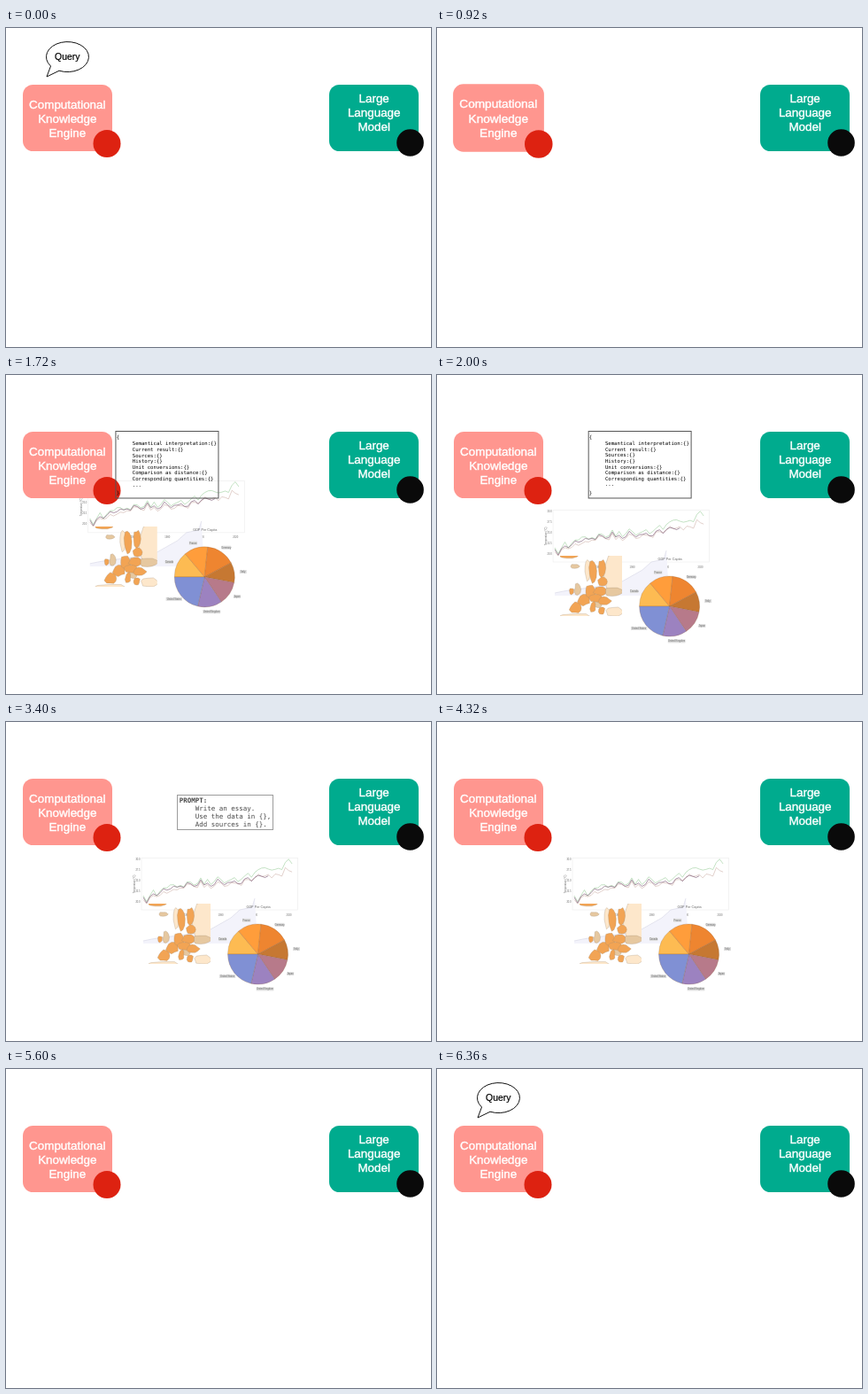
An HTML page for the animation above (6.4 s loop, 480 by 360 pixels).

```html
<!DOCTYPE html>
<html lang="en">
<head>
<meta charset="utf-8">
<title>Knowledge engine and language model</title>
<style>
html, body { margin: 0; width: 100%; height: 100%; overflow: hidden; background: #fff; }
svg { display: block; width: 480px; height: 360px; }
.sans { font-family: "Liberation Sans", Arial, sans-serif; }
.mono { font-family: "DejaVu Sans Mono", monospace; white-space: pre; }
.card { font-size: 13.4px; fill: #fff; stroke: #fff; stroke-width: .4; text-anchor: middle; }
.tiny { font-size: 2.7px; fill: #666; text-anchor: middle; }
.line { fill: none; stroke-width: .6; stroke-linejoin: round; }
</style>
</head>
<body>
<svg viewBox="0 0 480 360">
  <defs>
    <clipPath id="frame"><rect x="161" y="205" width="70" height="68"/></clipPath>
    <g id="figures">
      <rect x="153" y="153.5" width="176.5" height="58.5" fill="none" stroke="#ececec" stroke-width=".6"/>
      <g id="ticks" class="sans tiny"></g>
      <path d="M155 247C180 241 205 242 231 234L254 221L264 212L278 209L281 199L284 250H155Z" fill="#f3f3fb"/>
      <path d="M155 247C180 241 205 242 231 234L254 221L264 212L278 209L281 199" class="line" stroke="#d6d6e4"/>
      <g id="curves" class="line"></g>
      <g id="map" clip-path="url(#frame)" stroke="#a58d70" stroke-width=".3"></g>
      <g id="pie" stroke="#8a5a30" stroke-width=".25"></g>
      <text class="sans" x="285" y="210" font-size="3.8" fill="#666" text-anchor="middle">GDP Per Capita</text>
      <g id="labels" class="sans tiny"></g>
    </g>
    <g id="essay">
      <rect x=".5" y=".5" width="75" height="96" fill="#fff" stroke="#444" stroke-width=".8"/>
      <g id="prose" class="sans" font-size="2.15" fill="#222"></g>
    </g>
  </defs>

  <use id="group" href="#figures"/>
  <use id="doc" href="#essay"/>
  <g id="engine">
    <rect x="19" y="64" width="101" height="75" rx="11.5" fill="#ff968f"/>
    <g class="sans card">
      <text x="69.3" y="90.5">Computational</text>
      <text x="69.3" y="106.5">Knowledge</text>
      <text x="69.3" y="122.5">Engine</text>
    </g>
    <circle cx="114" cy="130.5" r="15.5" fill="#dd2211"/>
  </g>
  <g id="model">
    <rect x="365" y="64" width="101" height="75" rx="11.5" fill="#00ab8e"/>
    <g class="sans card">
      <text x="415.7" y="84.4">Large</text>
      <text x="415.7" y="100.4">Language</text>
      <text x="415.7" y="116.4">Model</text>
    </g>
    <circle cx="456.5" cy="129.5" r="15.3" fill="#0a0a0a"/>
  </g>
  <g id="bubble">
    <path d="M60 48.2A24 17 0 1 0 50.5 43L46 55Z" fill="#fff" stroke="#111" stroke-width="1" stroke-linejoin="round"/>
    <text class="sans" x="69.2" y="36.2" font-size="10.4" stroke="#000" stroke-width=".2" text-anchor="middle">Query</text>
  </g>
  <g id="json">
    <rect x="170.5" y="63.5" width="116" height="75.5" fill="none" stroke="#555" stroke-width="1"/>
  </g>
  <g id="prompt">
    <rect x="193.5" y="82.5" width="108" height="39" fill="#fff" stroke="#777" stroke-width="1"/>
  </g>
  <g id="page">
    <use href="#essay"/>
    <use href="#figures" transform="translate(-33.5 4.3) scale(.3)"/>
  </g>
</svg>
<script>
const NS = "http://www.w3.org/2000/svg";
const $ = id => document.getElementById(id);

function add(parent, tag, attrs, text) {
  const el = document.createElementNS(NS, tag);
  for (const k in attrs) el.setAttribute(k, attrs[k]);
  if (text) el.textContent = text;
  return $(parent).appendChild(el);
}

let seed = 7;
const rand = () => (seed = seed * 16807 % 2147483647) / 2147483647;

// Text boxes
function lines(id, list, x, y, step, size) {
  list.forEach((s, i) => add(id, "text", {
    class: "mono", x, y: y + i * step, "font-size": size,
    "font-weight": s === "PROMPT:" ? 700 : 400
  }, s));
}
const keys = ["Semantical interpretation", "Current result", "Sources", "History",
  "Unit conversions", "Comparison as distance", "Corresponding quantities"];
lines("json", ["{"], 171.2, 72.1, 0, 5.65);
lines("json", [...keys.map(k => k + ":{}"), "..."], 189.3, 79.3, 6.6, 5.65);
lines("json", ["}"], 171.2, 135, 0, 5.65);
lines("prompt", ["PROMPT:", "    Write an essay.", "    Use the data in {},", "    Add sources in {}."],
  195.8, 91.3, 8.75, 7.48);

// Line chart
for (let i = 0; i < 5; i++)
  add("ticks", "text", { x: 149, y: 155.5 + i * 12 }, (30 - i * 2.5).toFixed(1));
for (let i = 0; i < 4; i++)
  add("ticks", "text", { x: 204 + i * 38.5, y: 218.5 }, 1960 + i * 20);
add("ticks", "text", { transform: "translate(145.8 183) rotate(-90)" }, "Temperature (°C)");

const wave = Array.from({ length: 45 }, () => (rand() - .5) * 9);
function trace(color, lift, climb, end) {
  const pts = wave.slice(0, end).map((d, i) => {
    const trend = 203 - 14 * Math.min(1, i / 8) - i * .35;
    const late = climb * Math.max(0, i - 27) / 17;
    return [155 + i * 3.82, trend + d - lift * rand() - late];
  });
  add("curves", "polyline", { points: pts.join(" "), stroke: color });
}
trace("#9ccf9c", 5, 13, 45);
trace("#cfb3aa", -3, 7, 45);
trace("#75506e", 1, 0, 38);

// Map: each land is a rough blob, given as centre and radii
function land(fill, [x, y, rx, ry]) {
  const pts = [];
  for (let i = 0; i < 11; i++) {
    const a = i / 11 * 2 * Math.PI, r = .85 + .35 * rand();
    pts.push([(x + rx * r * Math.cos(a)).toFixed(1), (y + ry * r * Math.sin(a)).toFixed(1)]);
  }
  add("map", "polygon", { fill, points: pts.join(" ") });
}
const pale = [[226, 222, 16, 22], [222, 268, 10, 5], [180, 276, 21, 5], [192, 220, 3.5, 12]];
const tan = [[221, 246, 10, 5], [181, 243, 3.5, 7], [178, 217, 5, 2.5], [204, 260, 5, 4]];
const orange = [[170, 204, 11, 4], [198, 222, 4, 12], [208, 219, 4, 9], [209, 234, 5, 5],
  [174, 245, 2.5, 3.5], [179, 264, 7, 6], [188, 255, 7, 6], [195, 245, 6, 7], [206, 245, 7, 5],
  [201, 253, 7, 4], [198, 263, 3, 6], [211, 256, 7, 5], [208, 267, 3.5, 4]];
pale.forEach(c => land("#fde7cb", c));
tan.forEach(c => land("#e6c8a0", c));
orange.forEach(c => land("#f2a454", c));

// Pie: name, colour and end angle, clockwise from the top
const slices = [["Canada", "#fdbb52", 320], ["France", "#ff9d3b", 366], ["Germany", "#ee8530", 422],
  ["Italy", "#c67832", 461], ["Japan", "#b77a8a", 506], ["United Kingdom", "#9c82c0", 553],
  ["United States", "#8090d4", 630]];
const around = (deg, rx, ry) => {
  const a = deg * Math.PI / 180;
  return [284.5 + rx * Math.sin(a), 262 - ry * Math.cos(a)];
};
let from = 270;
for (const [name, fill, to] of slices) {
  add("pie", "path", { fill, d: `M284.5 262L${around(from, 34, 34)}A34 34 0 0 1 ${around(to, 34, 34)}Z` });
  const [x, y] = around((from + to) / 2, 44, 40), w = name.length * 1.3 + 1.5;
  add("labels", "rect", { x: x - w / 2, y: y - 2, width: w, height: 4, fill: "#dedede" });
  add("labels", "text", { x, y: y + 1 }, name);
  from = to;
}

// Essay text
const prose = ("The economy and the climate of a region are closely linked and the data shows how " +
  "each country has changed over time while the average income rose in most of them. ").repeat(2);
let row = 10.2;
for (const count of [6, 4, 5]) {
  for (let i = 0; i < count; i++, row += 2.25) {
    const start = prose.indexOf(" ", (i * 29 + count * 11) % 130) + 1;
    add("prose", "text", { x: 9, y: row }, prose.substr(start, i === count - 1 ? 46 : 57).trim());
  }
  row += 1.6;
}

// Motion
const LOOP = 6400, STEP = 40, RESET = 6360;
const ramp = (t, a, b) => Math.min(1, Math.max(0, (t - a) / (b - a)));
const ease = (t, a, b) => (1 - Math.cos(Math.PI * ramp(t, a, b))) / 2;
const pulse = (t, a, b) => 1 + .1 * Math.sin(Math.PI * ramp(t, a, b));

function put(id, dx, dy, opacity = 1, scale = 1, cx = 0, cy = 0) {
  const el = $(id);
  el.setAttribute("transform", `translate(${cx + dx} ${cy + dy}) scale(${scale}) translate(${-cx} ${-cy})`);
  el.setAttribute("opacity", opacity);
  el.setAttribute("visibility", opacity > 0 ? "visible" : "hidden");
}

function draw(time) {
  const t = time >= RESET ? 0 : time;
  put("bubble", 0, 66 * ease(t, 520, 840), 1 - ramp(t, 760, 920));
  put("engine", 0, 0, 1, pulse(t, 900, 1260), 69.5, 101.5);
  put("model", 0, 0, 1, pulse(t, 4320, 4640), 415.5, 101.5);

  const out = 1 - ease(t, 1280, 1960), on = ease(t, 1980, 2520);
  const shown = t >= 1280;
  const fade = 1 - ramp(t, 5120, 5400);
  put("group", -138 * out - 22 * (1 - on), -119.5 * out - (1 - on), shown ? fade : 0);
  put("json", -168 * out + 186.5 * on, 0, shown ? 1 - ramp(t, 2520, 2840) : 0, 1 - .15 * on, 229, 101.5);

  const send = ease(t, 3540, 4000);
  put("prompt", 168 * send, 0, ramp(t, 3080, 3520) * (1 - ramp(t, 4000, 4300)), 1 - .1 * send, 247.5, 102);

  const write = ease(t, 4600, 5100);
  put("doc", 378 - 52 * write, 56 + 91.5 * write, t >= 4600 ? fade : 0);
  put("page", 145, 118, ramp(t, 5720, 5880), 2.356);
}

function tick() {
  const t = performance.now() % LOOP;
  draw(Math.floor((t + .5) / STEP) * STEP % LOOP);
  requestAnimationFrame(tick);
}
tick();
</script>
</body>
</html>
```
